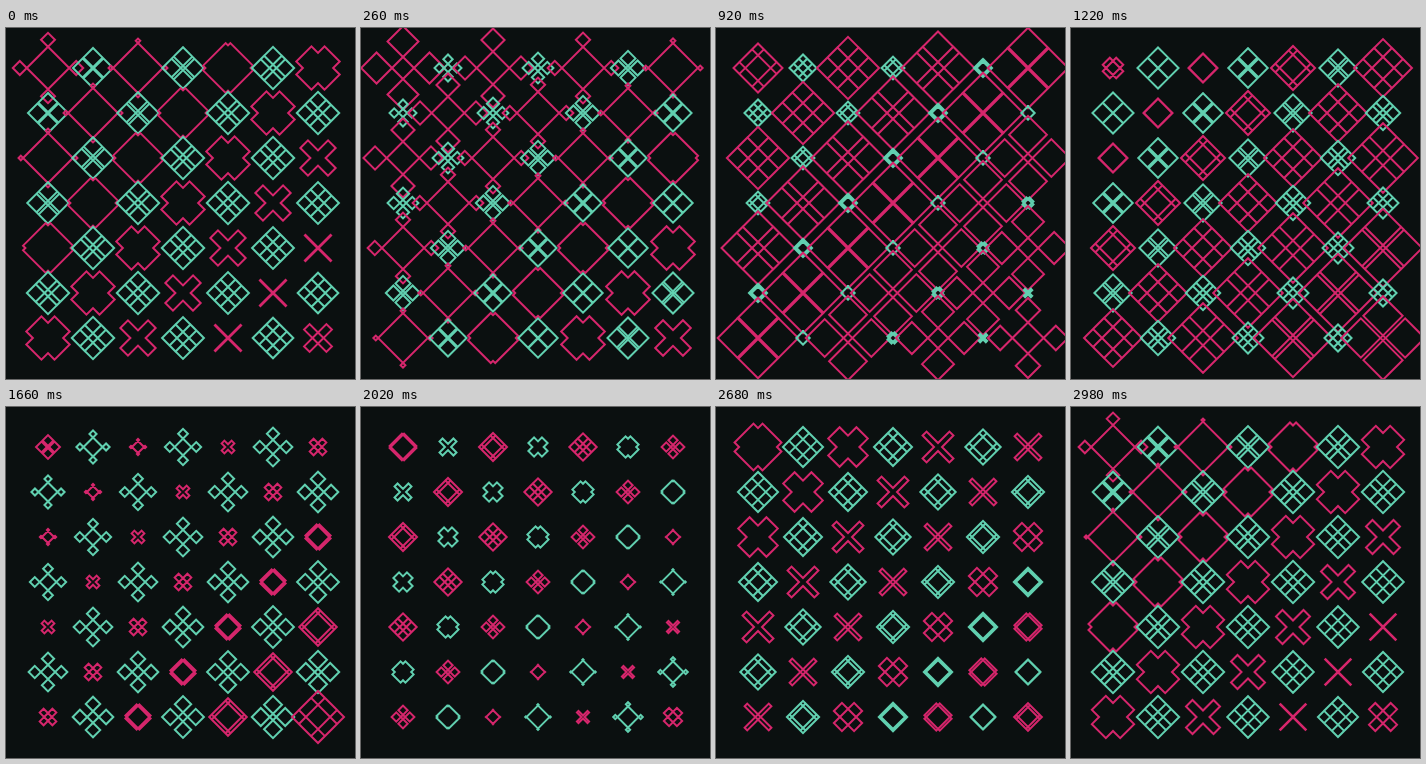
These frames come from a looping animation (349x351 px, 3000 ms). An HTML page with a canvas:

```html
<!DOCTYPE html>
<html lang="en">
<head>
<meta charset="utf-8">
<title>Folding crosses</title>
<style>
  html, body { margin: 0; width: 100%; height: 100%; overflow: hidden; background: #0b1010; }
  canvas { display: block; }
</style>
</head>
<body>
<canvas id="stage" width="349" height="351"></canvas>
<script>
const ctx = document.getElementById('stage').getContext('2d');
const LOOP = 3000;
const COUNT = 7;
const STEP = 45;

// Each wave swings around mid by amp and peaks at the given time (ms).
const KINDS = [
  {
    color: '#d6266c', delay: 64,
    arm: { mid: 5, amp: 15, peak: 2600 },
    edge: { mid: 10, amp: 20, peak: 350 }
  },
  {
    color: '#61d0b0', delay: 30,
    arm: { mid: -2.5, amp: 7.5, peak: 595 },
    edge: { mid: 0, amp: 15, peak: -190 }
  }
];

function wave(w, t) {
  return w.mid + w.amp * Math.cos((t - w.peak) / LOOP * Math.PI * 2);
}

// A plus outline turned by 45 degrees; negative values fold it through itself.
function cross(x, y, a, b) {
  const points = [
    [a, b], [b, b], [b, a], [-b, a], [-b, b], [-a, b],
    [-a, -b], [-b, -b], [-b, -a], [b, -a], [b, -b], [a, -b]
  ];
  ctx.beginPath();
  for (const [u, v] of points) {
    ctx.lineTo(x + (u - v) * Math.SQRT1_2, y + (u + v) * Math.SQRT1_2);
  }
  ctx.closePath();
  ctx.stroke();
}

function draw(t) {
  ctx.fillStyle = '#0b1010';
  ctx.fillRect(0, 0, 349, 351);
  ctx.lineWidth = 2;
  for (let row = 0; row < COUNT; row++) {
    for (let col = 0; col < COUNT; col++) {
      const k = row + col;
      const kind = KINDS[k % 2];
      const local = t - k * kind.delay;
      ctx.strokeStyle = kind.color;
      cross(42 + col * STEP, 40 + row * STEP, wave(kind.arm, local), wave(kind.edge, local));
    }
  }
}

const start = performance.now();
function tick() {
  draw((performance.now() - start) % LOOP);
  requestAnimationFrame(tick);
}
tick();
</script>
</body>
</html>
```
